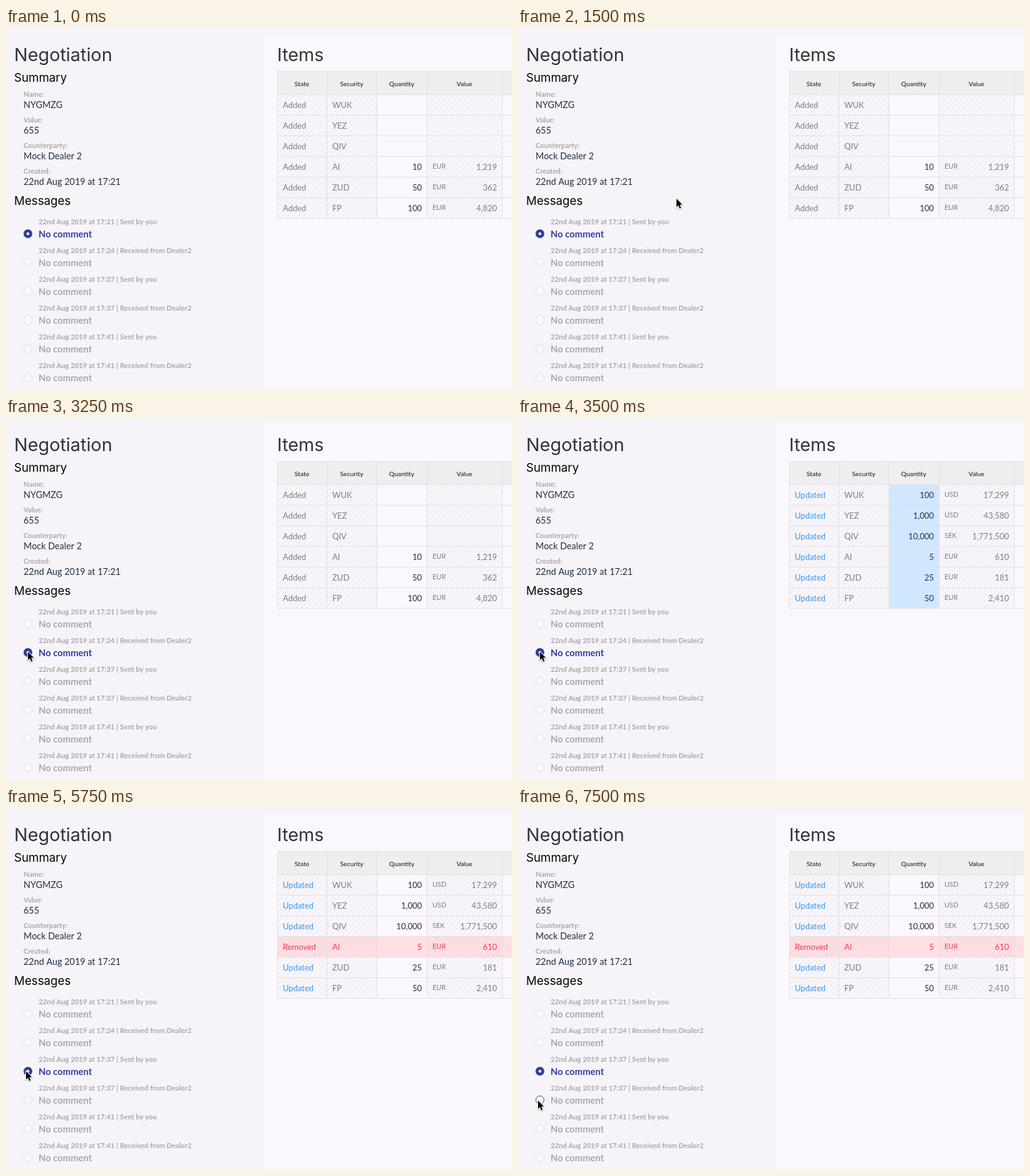
Recreate the animation shown at these times as an HTML page with a canvas. Size 808 by 579 pixels, loop 8000 ms.

```html
<!DOCTYPE html>
<html lang="en">
<head>
<meta charset="utf-8">
<title>Negotiation</title>
<style>
html, body { margin: 0; width: 100%; height: 100%; overflow: hidden; background: #f6f4f8; }
canvas { display: block; width: 808px; height: 579px; }
</style>
</head>
<body>
<canvas id="stage"></canvas>
<script>
const W = 808, H = 579, LOOP = 8000;
const canvas = document.getElementById('stage');
const ctx = canvas.getContext('2d');
const ratio = window.devicePixelRatio || 1;
canvas.width = W * ratio;
canvas.height = H * ratio;

const BODY = 'Lato, sans-serif', HEAD = 'Inter, sans-serif';
const INDIGO = '#303f9f', MUTED = '#aaa8ac', NAVY = '#22304a', GREY = '#807e84';
const BLUE = '#3b97ee', RED = '#f43b55', LINE = '#e1dee5';

// Each entry holds from its time until the next one.
const pointer = [
  [0, null], [250, [326, 220]], [500, [236, 289]], [750, [249, 276]],
  [1500, [253, 273]], [1750, [186, 294]], [2000, [47, 334]], [2250, [35, 363]],
  [2500, [35, 374]], [4500, [32, 404]], [4750, [33, 421]], [5000, [32, 421]],
  [6750, [34, 451]], [7000, [28, 480]], [7250, [32, 468]]
];
const selection = [[0, 0], [3250, 1], [5750, 2]];
const revision = [[0, 0], [3500, 1], [5750, 2]];

const summary = [
  ['Name:', 'NYGMZG'], ['Value:', '655'],
  ['Counterparty:', 'Mock Dealer 2'], ['Created:', '22nd Aug 2019 at 17:21']
];
const times = ['17:21', '17:24', '17:37', '17:37', '17:41', '17:41'];
const columns = [433, 512, 592, 672, 792];
const headers = ['State', 'Security', 'Quantity', 'Value'];
const securities = ['WUK', 'YEZ', 'QIV', 'AI', 'ZUD', 'FP'];
const opening = [[], [], [], ['10', 'EUR', '1,219'], ['50', 'EUR', '362'], ['100', 'EUR', '4,820']];
const revised = [
  ['100', 'USD', '17,299'], ['1,000', 'USD', '43,580'], ['10,000', 'SEK', '1,771,500'],
  ['5', 'EUR', '610'], ['25', 'EUR', '181'], ['50', 'EUR', '2,410']
];

function at(steps, t) {
  let value;
  for (const [start, v] of steps) if (t >= start) value = v;
  return value;
}

function rect(x, y, w, h, color) {
  ctx.fillStyle = color;
  ctx.fillRect(x, y, w, h);
}

function text(str, x, y, size, color, { align = 'left', weight = 400, family = BODY } = {}) {
  ctx.font = `${weight} ${size}px ${family}`;
  ctx.textAlign = align;
  ctx.fillStyle = color;
  ctx.fillText(str, x, y);
}

// Diagonal stripes, 3px on and 3px off, counted from the bottom right corner.
function hatch(x, y, w, h, color) {
  const step = 6 * Math.SQRT2;
  ctx.save();
  ctx.beginPath();
  ctx.rect(x, y, w, h);
  ctx.clip();
  ctx.beginPath();
  for (let d = step * 0.75; d < w + h + step; d += step) {
    ctx.moveTo(x + w - d - 4, y + h + 4);
    ctx.lineTo(x + w - d + h + 4, y - 4);
  }
  ctx.strokeStyle = color;
  ctx.lineWidth = 3;
  ctx.stroke();
  ctx.restore();
}

function drawRadio(y, selected, hovered) {
  ctx.beginPath();
  ctx.arc(35, y, selected ? 7 : 6.5, 0, Math.PI * 2);
  ctx.fillStyle = selected ? INDIGO : '#f9f7fb';
  ctx.fill();
  if (selected) {
    ctx.beginPath();
    ctx.arc(35, y, 2.2, 0, Math.PI * 2);
    ctx.fillStyle = '#fff';
    ctx.fill();
  } else {
    ctx.strokeStyle = hovered ? INDIGO : '#e0dde3';
    ctx.lineWidth = 1;
    ctx.stroke();
  }
}

function drawSidebar(selected, tip) {
  text('Negotiation', 13, 53, 28.8, '#353139', { family: HEAD });
  text('Summary', 13, 86, 18.72, '#050505', { family: HEAD });
  text('Messages', 13, 283, 18.72, '#050505', { family: HEAD });
  summary.forEach(([label, value], i) => {
    text(label, 28, 110 + i * 41, 11.25, MUTED, { weight: 700 });
    text(value, 28, 127.5 + i * 41, 14.4, NAVY);
  });
  times.forEach((time, i) => {
    const y = 329 + i * 46;
    const way = i % 2 ? 'Received from Dealer2' : 'Sent by you';
    const hovered = tip && Math.hypot(tip[0] - 35, tip[1] - y) < 7;
    text(`22nd Aug 2019 at ${time} | ${way}`, 52, y - 15, 11.25, MUTED, { weight: 700 });
    text('No comment', 52, y + 5.5, 14.8, i === selected ? INDIGO : MUTED, { weight: 700 });
    drawRadio(y, i === selected, hovered);
  });
}

function drawRow(i, rev) {
  const y = 106 + i * 33, base = y + 22;
  const removed = rev === 2 && i === 3;
  const [quantity = '', currency = '', value = ''] = (rev ? revised : opening)[i];
  const state = removed ? 'Removed' : rev ? 'Updated' : 'Added';
  const color = removed ? RED : GREY;
  if (removed) rect(433, y, W - 433, 33, '#ffdfe3');
  else if (rev === 1) rect(592, y, 80, 33, '#d1e7ff');
  for (const c of [0, 1, 3]) {
    hatch(columns[c], y, columns[c + 1] - columns[c], 33, removed ? '#fbdade' : '#f3eff5');
  }
  text(state, 442, base, 13, removed ? RED : rev ? BLUE : GREY);
  text(securities[i], 521, base, 13, color);
  text(quantity, 664, base, 13, removed ? RED : NAVY, { align: 'right' });
  text(currency, 681, base - 2, 11, color);
  text(value, 784, base, 13, color, { align: 'right' });
}

function drawTable(rev) {
  text('Items', 433, 53, 28.8, '#353139', { family: HEAD });
  rect(433, 69, W - 433, 37, '#f0edf1');
  headers.forEach((label, i) => {
    text(label, (columns[i] + columns[i + 1]) / 2, 93, 10.4, '#151317', { align: 'center' });
  });
  securities.forEach((_, i) => drawRow(i, rev));
  rect(433, 69, W - 433, 1, LINE);
  for (let i = 0; i < 7; i++) rect(433, 106 + i * 33, W - 433, 1, LINE);
  for (const x of columns) rect(x, 69, 1, 236, LINE);
}

function drawPointer([x, y]) {
  ctx.save();
  ctx.translate(x, y);
  ctx.beginPath();
  [[0, 0], [0, 13.2], [3, 10.4], [5.2, 15.4], [7.4, 14.4], [5.2, 9.6], [9.3, 9.3]]
    .forEach(([px, py]) => ctx.lineTo(px, py));
  ctx.closePath();
  ctx.lineJoin = 'round';
  ctx.shadowColor = 'rgba(0,0,0,0.3)';
  ctx.shadowBlur = 2 * ratio;
  ctx.shadowOffsetY = ratio;
  ctx.strokeStyle = '#fff';
  ctx.lineWidth = 2;
  ctx.stroke();
  ctx.shadowColor = 'transparent';
  ctx.fillStyle = '#000';
  ctx.fill();
  ctx.restore();
}

function draw(now) {
  const t = now % LOOP;
  const tip = at(pointer, t);
  ctx.setTransform(ratio, 0, 0, ratio, 0, 0);
  rect(0, 0, W, H, '#f6f4f8');
  rect(412, 9, W - 412, H - 9, '#faf8fc');
  drawSidebar(at(selection, t), tip);
  drawTable(at(revision, t));
  if (tip) drawPointer(tip);
}

const start = performance.now();
function tick() {
  draw(performance.now() - start);
  requestAnimationFrame(tick);
}
tick();
</script>
</body>
</html>
```
